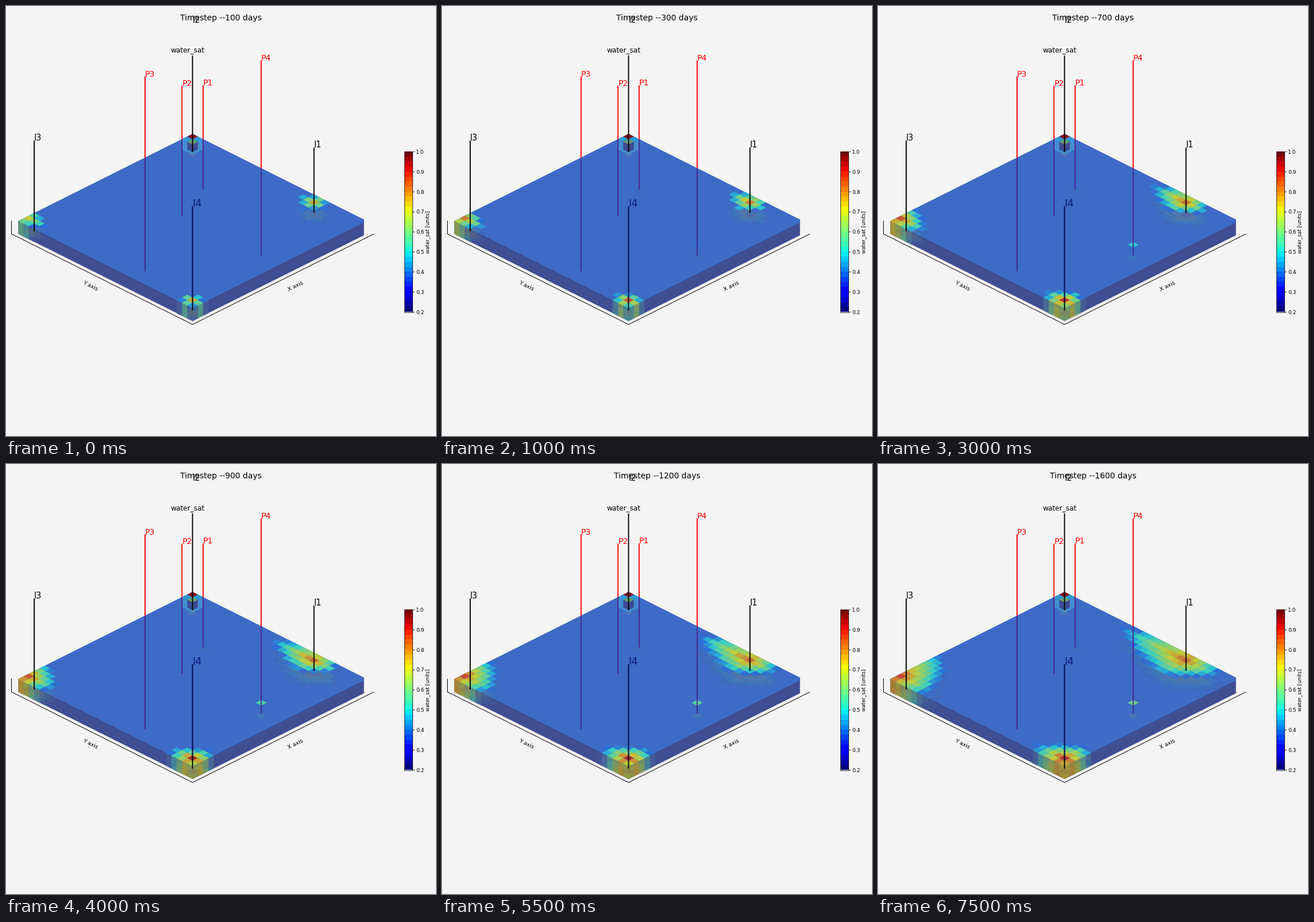
Write a matplotlib script that moves like this. It is 748x748 px and loops after 8 s.

```python
import numpy as np
import matplotlib
import matplotlib.pyplot as plt
from matplotlib.animation import FuncAnimation
from matplotlib.collections import PolyCollection
from matplotlib.patches import Polygon, Rectangle

SIZE, N, STEPS = 748, 33, 16
CX, TOP_Y = 324.5, 222.5
CW, CH, DEPTH = 303 / N, 151.5 / N, 22.5
PT = 0.72  # points per pixel at 100 dpi
FRONT = 0.39  # saturation at the edge of a plume

TOP = np.array([61, 107, 197]) / 255
SIDE = np.array([63, 77, 146]) / 255
HAZE = np.array([110, 130, 150]) / 255
JET = matplotlib.colormaps["jet"].resampled(32)
NOISE = np.random.default_rng(4).uniform(-1, 1, (N, N))
I, J = np.mgrid[0:N, 0:N]

plt.rcParams["font.family"] = "DejaVu Sans"
fig = plt.figure(figsize=(7.48, 7.48), dpi=100, facecolor="#f4f4f4")
ax = fig.add_axes([0, 0, 1, 1])
ax.set(xlim=(0, SIZE), ylim=(SIZE, 0))
ax.axis("off")


def pos(i, j, drop=0):
    return CX + (j - i) * CW, TOP_Y + (i + j) * CH + drop


def diamond(i, j, drop=0):
    corners = ((i, j), (i + 1, j), (i + 1, j + 1), (i, j + 1))
    return [pos(a, b, drop) for a, b in corners]


def wall(a, b):
    return [pos(*a), pos(*b), pos(*b, DEPTH), pos(*a, DEPTH)]


def label(x, y, s, px, **kw):
    return ax.text(x, y, s, fontsize=px * PT, **kw)


def line(xs, ys, color="black", px=1.9, z=6):
    ax.plot(xs, ys, color=color, lw=px * PT, zorder=z,
            solid_capstyle="butt", snap=False)


def poly(pts, color, z=1, **kw):
    patch = Polygon(pts, closed=True, fc=color, ec="none", zorder=z, **kw)
    return ax.add_patch(patch)


def tint(v):
    """Hazy colour of a cell, never below the plume edge."""
    c = np.array(JET((max(v, FRONT) - 0.2) / 0.8)[:3])
    return 0.62 * c + 0.38 * HAZE


def blend(base, color, v):
    m = np.clip((v - 0.2) / (FRONT - 0.2), 0, 1) * 0.9
    m += 0.1 * np.clip((v - FRONT) / 0.1, 0, 1)
    return base * (1 - m) + color * m


def top_color(v):
    return blend(TOP, tint(v), v)


def side_color(v):
    shade = 0.6 * tint(v - 0.05) + np.array([45, 25, 20]) / 255
    return blend(SIDE, shade, v)


def plume(ci, cj, up, down, left, right, peak, fall):
    """Saturation around an injector; reaches are in cells."""
    di, dj = I - ci, J - cj
    a = np.abs(di) / np.where(di < 0, up, down)
    b = np.abs(dj) / np.where(dj < 0, left, right)
    r = (a ** 1.25 + b ** 1.25) ** (1 / 1.25)
    r = np.where(r > 0, np.clip(r + 0.06 * NOISE, 0, None), 0)
    body = FRONT + (peak - FRONT) * np.clip(1 - r, 0, 1) ** fall
    edge = FRONT - 1.8 * (r - 1)
    return np.where(r < 1, body + 0.02 * NOISE, np.clip(edge, 0.2, FRONT))


def saturation(s):
    rise = 1 - np.exp(-s / 2)
    v = np.maximum.reduce([
        plume(1, 24, 2 + 0.2 * s, 1.9 + 0.18 * s, 2.3 + 0.62 * s,
              2 + 0.23 * s, 0.76 + 0.08 * rise, 0.9),
        plume(31, 0, 1.8 + 0.05 * s + 0.022 * s * s, 2.2 + 0.35 * s,
              2, 3 + 0.17 * s, 0.71 + 0.16 * rise, 0.9),
        plume(31, 31, 1.4 + 0.18 * s, 2 + 0.25 * s, 1.9 + 0.2 * s,
              2 + 0.25 * s, 0.76 + 0.16 * rise, 1.1),
    ])
    v[14, 27] = min(0.2 + 0.05 * s, 0.5 + 0.006 * s)
    v[7, 9] = 0.2 + 0.02 * min(s / 4, 1)
    return v


# slab, cut off vertically at the right
RIGHT = 622.7
cut = (CX + 303 - RIGHT) / 2
left, right = pos(N, 0), pos(0, N)
front, back = pos(N, N), pos(0, 0)
right_top = (RIGHT, right[1] - cut)
right_low = (RIGHT, right[1] + cut)


def lower(p):
    return p[0], p[1] + DEPTH


silhouette = [back, left, lower(left), lower(front), lower(right_low),
              right_top]
poly(silhouette, SIDE)
body = poly(silhouette, "none")
poly([back, left, front, right_low, right_top], TOP)
for k in range(1, N):
    for i, j in ((N, k), (k, N)):
        x, y = pos(i, j)
        if x < RIGHT:
            ax.plot([x, x], [y, y + DEPTH], color="white", alpha=0.08,
                    lw=0.5, ls=":", zorder=1)


def cells(z, **kw):
    return ax.add_collection(
        PolyCollection([], zorder=z, linewidths=0.3, **kw))


sides, ghosts, tops = cells(2), cells(3, alpha=0.2), cells(4)
ghosts.set_clip_path(body)


def pillar(w, y0, y1):
    """Hexagon of half width w seen from above, between two heights."""
    h = w / 2
    return [(CX - w, y0), (CX, y0 + h), (CX + w, y0), (CX + w, y1),
            (CX, y1 + h), (CX - w, y1)]


# cluster at the back corner
poly(diamond(1, 1, DEPTH), (0.5, 0.55, 0.6), 4, alpha=0.25)
for i, j in ((0, 1), (1, 0)):
    poly(diamond(i, j), top_color(0.44), 4)
poly(pillar(18.4, 231.5, 249.5), (0.3, 0.72, 0.88), 4, alpha=0.45)
poly(pillar(9.2, 235.5, 249.5), (0.24, 0.29, 0.58), 4)
poly(diamond(1, 1), (0.4, 0.62, 0.42), 4)
poly(diamond(0, 0), (0.54, 0.08, 0.09), 4)

# wells: name, cell, line top
for name, i, j, y0 in (("P1", 7, 9, 138), ("P2", 14, 12, 138.5),
                       ("P3", 28, 19, 122.5), ("P4", 14, 27, 94.5)):
    x, y = pos(i + 0.5, j + 0.5, 18.5)
    enter = TOP_Y + abs(x - CX) / 2
    line([x, x], [y0, enter], "red")
    line([x, x], [enter, y], (0.29, 0.15, 0.56))
    label(x, y0, name, 14, color="red")

NAVY = (0.05, 0.13, 0.48)
for name, i, j, y0 in (("I1", 1, 24, 246), ("I2", 1, 1, 86),
                       ("I3", 31, 1, 234), ("I4", 31, 31, 348.5)):
    x, y = pos(i + 0.5, j + 0.5, 18)
    line([x, x], [y0, y])
    if name == "I4":
        line([x, x], [y0, 506], NAVY)
        label(x, y0 + 0.5, name, 18, color=NAVY, zorder=7)
    else:
        label(x, 28.5 if name == "I2" else y0, name, 14.5)

# floor axes
line([9.5, 9.5, CX, 640], [373.5, 396.5, 554, 396.5], px=1)
mid = dict(ha="center", va="center")
label(503.3, 487.3, "X axis", 9.5, rotation=26.5, **mid)
label(146.3, 487.3, "Y axis", 9.5, rotation=-26.5, **mid)
label(316.3, 80.5, "water_sat", 12, ha="center")
title = label(374.3, 25, "", 13.9, ha="center")

# colour bar
X0, X1, Y0, Y1 = 693.5, 707.5, 253.5, 532.5
ramp = np.linspace(1, 0, 32)[:, None]
ax.imshow(ramp, cmap=JET, extent=(X0, X1, Y1, Y0), aspect="auto",
          interpolation="nearest", zorder=2)
ax.set(xlim=(0, SIZE), ylim=(SIZE, 0))
ax.add_patch(Rectangle((X0, Y0), X1 - X0, Y1 - Y0, fc="none", ec="black",
                       lw=0.8 * PT, zorder=3))
for k in range(9):
    y = Y1 - (Y1 - Y0) * k / 8
    line([X1, X1 + 3.5], [y, y], px=0.8)
    label(713.3, y + 3.3, f"{0.2 + k / 10:.1f}", 9)
label(733.3, 393.3, "water_sat [units]", 8.8, rotation=90, **mid)


def fill(coll, shapes, colors):
    coll.set_verts(shapes)
    coll.set_facecolor(colors)
    coll.set_edgecolor(colors)


def draw(s):
    v = saturation(s)
    hot = [(i, j) for i, j in zip(*np.nonzero(v > 0.205))]
    fill(tops, [diamond(*c) for c in hot], [top_color(v[c]) for c in hot])
    fill(ghosts, [diamond(*c, DEPTH) for c in hot],
         [0.6 * top_color(v[c]) + 0.15 for c in hot])
    walls, tints = [], []
    for i, j in hot:
        if i == N - 1:
            walls.append(wall((N, j), (N, j + 1)))
            tints.append(side_color(v[i, j]))
        if j == N - 1:
            walls.append(wall((i, N), (i + 1, N)))
            tints.append(side_color(v[i, j]))
    fill(sides, walls, tints)
    title.set_text(f"Timestep --{100 * (s + 1)} days")
    return tops, ghosts, sides, title


anim = FuncAnimation(fig, draw, frames=STEPS, interval=500, repeat=True,
                     repeat_delay=0, blit=False)
plt.show()
```
